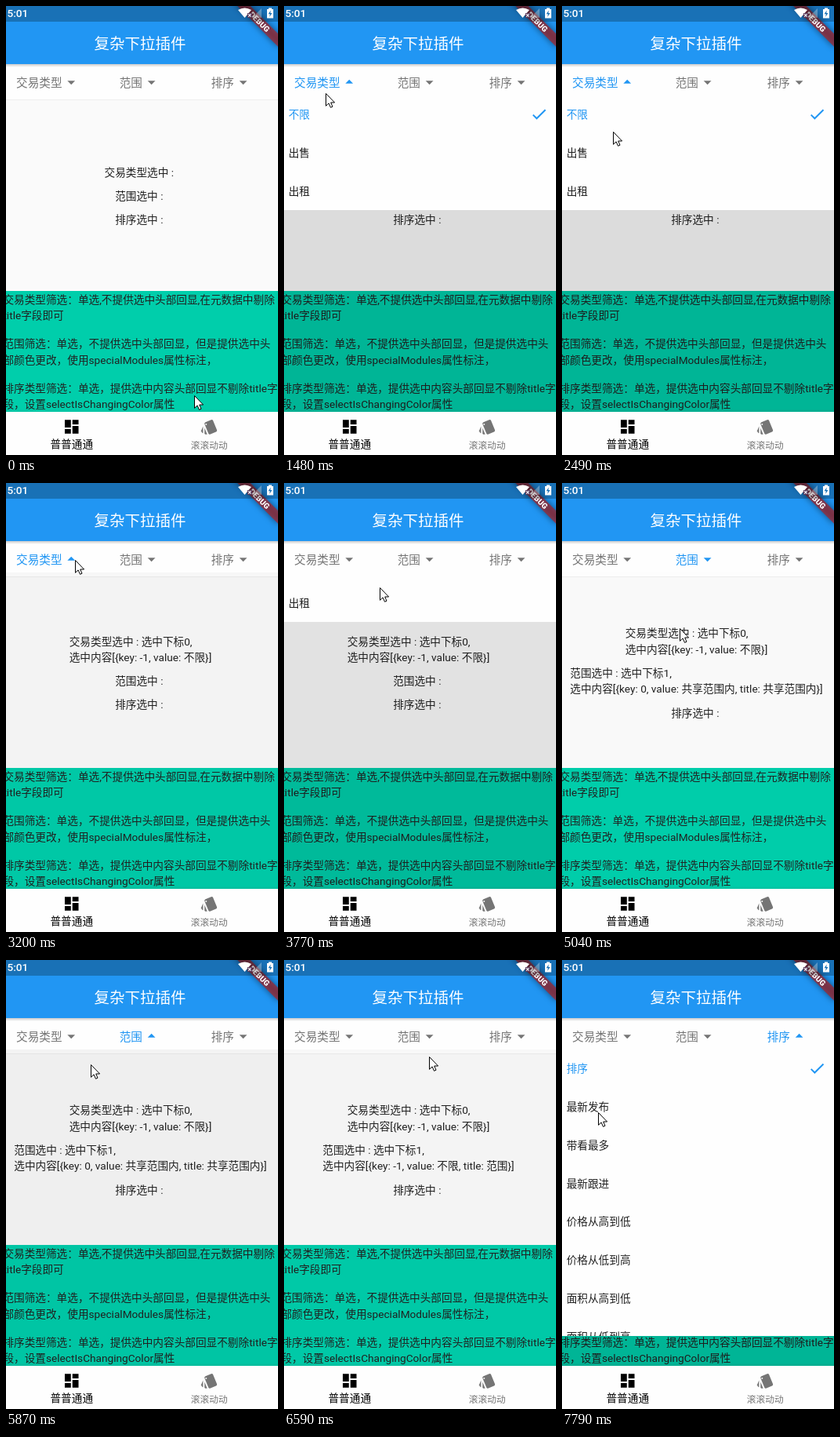
Animation of 347x572 px, one loop 8 s. Source, as an HTML page with a canvas:

```html
<!DOCTYPE html>
<html lang="zh-CN">
<head>
<meta charset="utf-8">
<title>复杂下拉插件</title>
<style>
html, body { margin: 0; width: 100%; height: 100%; overflow: hidden; background: #fafafa; }
canvas { display: block; width: 347px; height: 572px; }
</style>
</head>
<body>
<canvas id="stage"></canvas>
<script>
const W = 347, H = 572, LOOP = 8000;
const U = 0.975;              // logical pixel
const MID = 171.5;            // centre of the phone screen
const COLUMN = 120 * U, ROW = 50 * U, LINE = 20.4;
const MENU_TOP = 114, BODY_TOP = 363, NAV_TOP = 517;
const BLUE = '#2196f3', GREY = '#757575', INK = '#212121', SURFACE = '#fefefe';

const canvas = document.getElementById('stage');
const c = canvas.getContext('2d');
const dpr = window.devicePixelRatio || 1;
canvas.width = W * dpr;
canvas.height = H * dpr;

// The screen refreshes at a steady, slow rate
const STEP = 142, PHASE = 48, FADE = 176;
const PICK_TYPE = 2700, PICK_RANGE = 4850, RESET_RANGE = 6439;

const openings = [
  { id: 0, from: 1250, to: PICK_TYPE },
  { id: 0, from: 3130, to: 3710 },
  { id: 1, from: 4173, to: PICK_RANGE },
  { id: 1, from: 5805, to: RESET_RANGE },
  { id: 2, from: 6900, to: Infinity }
];

// Pointer stops: time, x, y
const stops = [
  [130, 240, 496], [790, 32, 71], [1050, 50, 98], [2462, 65, 160], [3130, 88, 98],
  [3740, 122, 133], [4050, 165, 98], [4308, 155, 130], [5000, 150, 185], [5728, 150, 98],
  [5870, 108, 133], [6580, 185, 123], [6900, 275, 98], [7716, 46, 194]
];

const menus = [
  { title: '交易类型', items: ['不限', '出售', '出租'] },
  { title: '范围', items: ['不限', '共享范围内', '共享范围外'] },
  { title: '排序', items: ['排序', '最新发布', '带看最多', '最新跟进',
    '价格从高到低', '价格从低到高', '面积从高到低', '面积从低到高'] }
];

const notes = [
  ['交易类型筛选：单选,不提供选中头部回显,在元数据中剔除', 'title字段即可'],
  ['范围筛选：单选，不提供选中头部回显，但是提供选中头', '部颜色更改，使用specialModules属性标注，'],
  ['排序类型筛选：单选，提供选中内容头部回显不剔除title字', '段，设置selectIsChangingColor属性']
];

const clamp = v => Math.max(0, Math.min(1, v));
const smooth = k => k * k * (3 - 2 * k);
const rangePicked = t => t >= PICK_RANGE && t < RESET_RANGE;

function rect(x, y, w, h, color) {
  c.fillStyle = color;
  c.fillRect(x, y, w, h);
}

function poly(points, color) {
  c.fillStyle = color;
  c.beginPath();
  points.forEach(p => c.lineTo(...p));
  c.closePath();
  c.fill();
}

function font(size = 14, weight = 400) {
  c.font = `${weight} ${size * U}px Roboto, "Noto Sans CJK SC", "Noto Sans CJK", sans-serif`;
}

function width(str, size) {
  font(size);
  return c.measureText(str).width;
}

// y is the visual middle of the line
function text(str, x, y, size = 14, color = INK, align = 'left', weight = 400) {
  font(size, weight);
  c.textAlign = align;
  c.fillStyle = color;
  c.fillText(str, x, y + size * U * 0.37);
}

function shade(y, h, from, to) {
  const g = c.createLinearGradient(0, y, 0, y + h);
  g.addColorStop(0, `rgba(0,0,0,${from})`);
  g.addColorStop(1, `rgba(0,0,0,${to})`);
  rect(0, y, W, h, g);
}

// Draws in logical pixels around a local origin
function at(x, y, paint) {
  c.save();
  c.translate(x, y);
  c.scale(U, U);
  paint();
  c.restore();
}

function pointerAt(t) {
  const i = stops.findIndex(s => s[0] > t);
  if (i === 0) return stops[0].slice(1);
  if (i < 0) return stops[stops.length - 1].slice(1);
  const [t0, x0, y0] = stops[i - 1], [t1, x1, y1] = stops[i];
  const k = smooth((t - t0) / (t1 - t0));
  return [Math.round(x0 + (x1 - x0) * k), Math.round(y0 + (y1 - y0) * k)];
}

function menuAt(t) {
  const last = openings.filter(o => o.from <= t).pop();
  if (!last) return { id: -1, open: false, fade: 0 };
  const open = t < last.to;
  const fade = clamp(open ? (t - last.from) / FADE : 1 - (t - last.to) / FADE);
  return { id: last.id, open, fade };
}

function drawResults(t) {
  const type = ['交易类型选中 : '], range = ['范围选中 : '], sort = ['排序选中 : '];
  if (t >= PICK_TYPE) {
    type[0] += '选中下标0,';
    type.push('选中内容[{key: -1, value: 不限}]');
  }
  if (t >= PICK_RANGE) {
    range[0] += '选中下标1,';
    range.push(rangePicked(t) ? '选中内容[{key: 0, value: 共享范围内, title: 共享范围内}]'
      : '选中内容[{key: -1, value: 不限, title: 范围}]');
  }
  const blocks = [type, range, sort], gap = 30.2;
  let y = 242 - gap - (blocks.flat().length - blocks.length) * LINE / 2;
  for (const lines of blocks) {
    const x = MID - Math.max(...lines.map(s => width(s))) / 2;
    lines.forEach((s, i) => text(s, x, y + i * LINE));
    y += gap + (lines.length - 1) * LINE;
  }
}

function drawNotes() {
  rect(0, BODY_TOP, W, NAV_TOP - BODY_TOP, '#00ceab');
  notes.forEach((lines, n) => lines.forEach((s, i) => text(s, -3.6, 373.5 + n * 56.6 + i * LINE)));
}

function drawHeader(menu, t) {
  rect(0, 74, W, 45.5, SURFACE);
  rect(0, 119, W, 1, '#eeeeee');
  menus.forEach(({ title }, i) => {
    const up = menu.open && menu.id === i;
    const color = up || (i === 1 && rangePicked(t)) ? BLUE : GREY;
    const w = width(title, 15);
    const x = MID - 0.5 + (i - 1) * COLUMN - (w + 24 * U) / 2;
    text(title, x, 97.5, 15, color);
    at(x + w + 12 * U, up ? 96.2 : 97.8, () => {
      const d = up ? -2.5 : 2.5;
      poly([[-5, -d], [5, -d], [0, d]], color);
    });
  });
}

function drawCheck(x, y) {
  at(x, y, () => {
    c.strokeStyle = BLUE;
    c.lineWidth = 2;
    c.beginPath();
    c.moveTo(-8, 0.5);
    c.lineTo(-3.2, 5.3);
    c.lineTo(8.2, -6);
    c.stroke();
  });
}

function drawPanel(menu, t) {
  if (!menu.fade) return;
  rect(0, MENU_TOP, W, NAV_TOP - MENU_TOP, `rgba(0,0,0,${0.12 * menu.fade})`);
  const { items } = menus[menu.id];
  const full = Math.min(365, items.length * ROW);
  const h = Math.round(full * clamp((menu.fade - 0.733) / 0.225));
  const picked = menu.id === 1 && rangePicked(t) ? 1 : 0;
  c.save();
  c.beginPath();
  c.rect(0, MENU_TOP, W, h);
  c.clip();
  rect(0, MENU_TOP, W, h, SURFACE);
  items.forEach((item, i) => {
    const y = MENU_TOP + h - full + (i + 0.5) * ROW;
    text(item, 5.7, y, 14, i === picked ? BLUE : INK);
    if (i === picked) drawCheck(325.5, y);
  });
  c.restore();
}

function drawBanner() {
  at(W, -3.4, () => {
    c.rotate(Math.PI / 4);
    c.filter = `blur(${4 * dpr}px)`;
    rect(-40, 28, 80, 12, 'rgba(0,0,0,.5)');
    c.filter = 'none';
    rect(-40, 28, 80, 12, 'rgba(183,28,28,.63)');
    text('DEBUG', 0, 34, 10.4, '#fff', 'center', 900);
  });
}

function drawStatus() {
  rect(0, 0, W, 20, 'rgba(0,0,0,.25)');
  text('5:01', 1.5, 8.7, 14, '#fff', 'left', 500);
  c.fillStyle = '#fff';
  c.beginPath();
  c.moveTo(304.5, 15);
  c.lineTo(296, 5);
  c.quadraticCurveTo(304.5, 0, 313, 5);
  c.fill();
  rect(308, 9, 6, 6, '#5a3a5c');
  text('×', 310.8, 11.5, 9, '#fff', 'center', 700);
  poly([[314, 15], [326, 15], [326, 3]], 'rgba(255,255,255,.3)');
  rect(333, 4, 8, 11.5, '#fff');
  rect(335, 2.5, 4, 2, '#fff');
  poly([[337.8, 5.5], [334.6, 10.3], [336.8, 10.3], [336.2, 14], [339.4, 9], [337.2, 9]], '#1971b6');
}

function drawTiles(x, y) {
  at(x, y, () => {
    for (const side of [-1, 1]) {
      const left = side < 0 ? -9 : 1;
      rect(left, -9, 8, side < 0 ? 10 : 6, '#000');
      rect(left, side < 0 ? 3 : -1, 8, side < 0 ? 6 : 10, '#000');
    }
  });
}

function drawCards(x, y) {
  at(x, y, () => {
    poly([[-9.5, 7.6], [-8.1, 8.2], [-8.1, -0.8], [-10.6, 5.3]], GREY);
    poly([[-6.1, 1.4], [-6.1, 9], [-5, 9.75], [-2.7, 9.75]], GREY);
    c.translate(2, 0.2);
    c.rotate(-Math.PI / 8);
    c.beginPath();
    c.roundRect(-6, -8.5, 12, 17, 2);
    c.arc(-4.2, -5.6, 1, 0, 2 * Math.PI);
    c.fillStyle = GREY;
    c.fill('evenodd');
  });
}

function drawNav() {
  shade(NAV_TOP - 4, 4, 0, 0.06);
  rect(0, NAV_TOP, W, H - NAV_TOP, SURFACE);
  const left = MID - 90 * U, right = MID + 90 * U;
  drawTiles(left, 536);
  drawCards(right, 536.2);
  text('普普通通', left, 558, 14, '#000', 'center');
  text('滚滚动动', right, 559.5, 12, GREY, 'center');
}

function drawPointer(t) {
  c.save();
  c.translate(...pointerAt(t));
  c.strokeStyle = '#000';
  c.lineWidth = 1;
  poly([[0.5, 0.5], [0.5, 16.3], [4.1, 12.9], [6.5, 18.3], [9, 17.2], [6.7, 12], [11.6, 12]], '#fff');
  c.stroke();
  c.restore();
}

function draw(t) {
  const menu = menuAt(t);
  c.setTransform(dpr, 0, 0, dpr, 0, 0);
  rect(0, 0, W, H, '#fafafa');
  drawResults(t);
  drawNotes();
  drawHeader(menu, t);
  drawPanel(menu, t);
  drawNav();
  rect(0, 0, W, 74, BLUE);
  shade(74, 4, 0.2, 0);
  text('复杂下拉插件', MID - 0.5, 48, 20, '#fff', 'center', 500);
  drawBanner();
  drawStatus();
  drawPointer(t);
}

const begin = performance.now();
function tick() {
  const t = (performance.now() - begin) % LOOP;
  draw(Math.max(0, Math.floor((t - PHASE) / STEP) * STEP + PHASE));
  requestAnimationFrame(tick);
}
tick();
</script>
</body>
</html>
```
